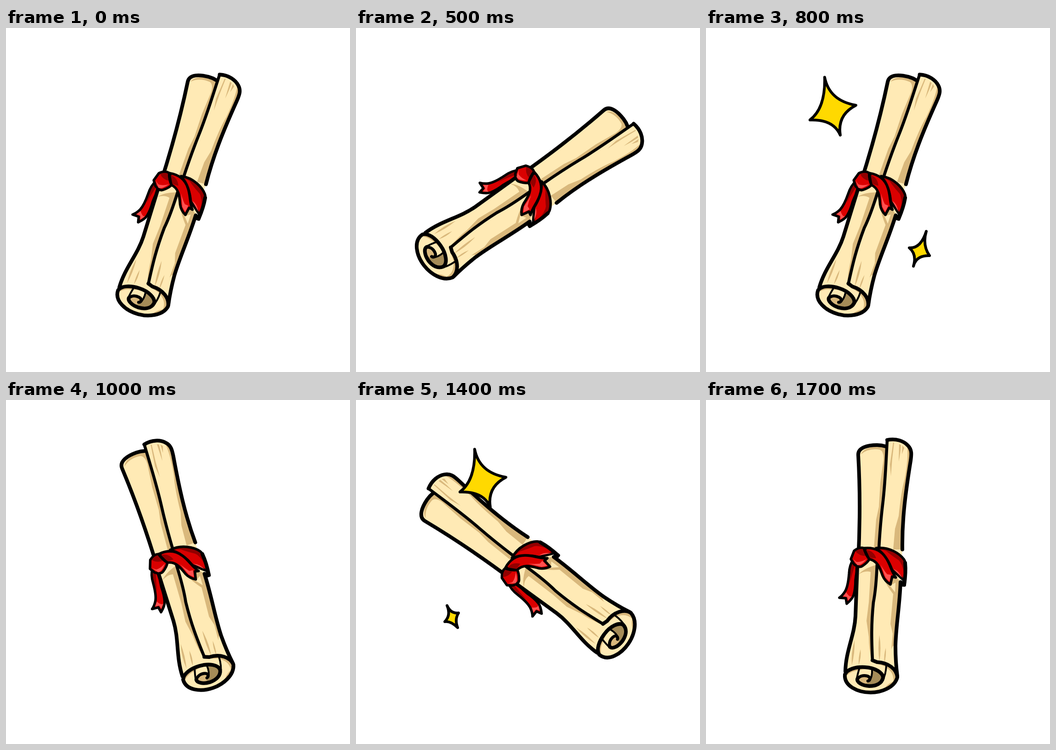
An HTML page without scripts that plays this animation: 748 by 748 pixels, repeating every 1.8 s.

```html
<!DOCTYPE html>
<html lang="en">
<head>
<meta charset="utf-8">
<title>Swinging scroll</title>
<style>
  html, body { margin: 0; width: 100%; height: 100%; overflow: hidden; background: #fff; }
  svg { display: block; width: 100%; height: 100%; }
  path { stroke-linecap: round; stroke-linejoin: round; }
  .line { fill: none; stroke: #000; stroke-width: 8; }
  .mid { stroke-width: 6.5; }
  .thin { stroke-width: 4; }
  .paper { fill: #ffeab5; }
  .shade { fill: #d9b87c; }
  .deep { fill: #a58c58; }
  .red { fill: #da0000; }
  .dark { fill: #920000; }
  .light { fill: #ff5050; }
  .edge { stroke: #000; stroke-width: 5.5; }
  .star { fill: #ffd900; stroke: #000; stroke-width: 6; }
</style>
</head>
<body>
<svg viewBox="0 0 748 748">
  <g transform="translate(375 362)">
    <g>
      <animateTransform attributeName="transform" type="rotate" calcMode="discrete" dur="1.8s" repeatCount="indefinite"
        values="15;30;44;52.1;74;52.1;44;30;15;0;-19.6;-38;-56;-69;-56;-38;-19.6;0"/>
      <g transform="translate(-375 -362)">

        <!-- left ribbon tail -->
        <path class="red edge" d="M321 346Q312 358 311 378Q309 404 303 415Q298 424 290 430L304 431L306 443Q318 433 321 424Q325 411 325 392Q327 370 334 358Z"/>
        <path class="dark" d="M320 352Q314 362 314 378L313 398Q318 376 323 362Z"/>
        <path class="light" d="M305 418L298 427L307 428L309 436L317 427Q311 429 305 418Z"/>

        <!-- paper -->
        <path class="paper" d="M331 120C330 103 352 98 372 98Q382 98 392 101L394 87C413 83 430 89 439 99C448 108 447 118 445 132C434 200 426 260 427 325L423 400C421 450 413 490 412 535Q412 570 417 602C408 630 375 637 358 636C330 636 300 622 302 596C304 545 323 512 325 470L331 350C335 270 335 190 331 120Z"/>

        <!-- paper shadows -->
        <path class="shade" d="M337 118C345 101 372 99 391 102L376 322H365L370 260L376 232L379 180L386 130Q387 112 378 108Q354 104 337 118Z"/>
        <path class="shade" d="M437 98Q448 108 445 132C434 200 426 260 427 325H407L411 280L419 252Q424 200 432 172Q441 122 437 98Z"/>
        <path class="shade" d="M407 92L400 140L402 166Q404 130 409 93ZM420 96L419 134Q423 115 424 98ZM427 99L426 118L431 104Z"/>
        <path class="shade" d="M332 379Q343 366 372 358L367 410L361 470Q358 510 360 568Q354 540 354 515L349 480L354 440L358 374Q346 370 332 379Z"/>
        <path class="shade" d="M374 366L385 386Q393 404 407 422L404 455L401 487L406 508L403 542Q409 525 412 545L412 520Q414 480 419 455L424 396L400 372Z"/>
        <path class="paper" d="M400 404L412 397L411 418Z"/>
        <path class="shade" d="M323 522Q324 550 317 577Q315 550 323 522ZM336 542Q338 560 332 576Q331 560 336 542ZM377 511Q382 540 377 569Q373 540 377 511ZM391 539Q392 558 388 571Q386 555 391 539Z"/>

        <!-- rolled end -->
        <path class="shade" d="M305 592Q320 580 345 580Q376 583 385 602Q380 618 358 623Q334 622 328 608L334 588Q318 588 306 599Z"/>
        <path class="shade" d="M365 571Q402 575 414 594L417 604Q410 622 384 632Q393 618 407 612Q410 592 388 579Z"/>
        <path class="paper" d="M333 588Q348 582 362 588L360 605Q358 598 347 599Q337 600 329 606Z"/>
        <path class="deep" d="M363 586Q378 590 383 602Q379 617 360 621Q350 620 347 617Q362 614 363 586Z"/>
        <path class="line thin" d="M333 585Q330 595 328 605M361 586Q362 602 355 611M392 578Q391 597 384 610"/>

        <!-- outlines -->
        <path class="line" d="M331 350C335 270 335 190 331 120C330 103 352 98 372 98Q382 98 391 101"/>
        <path class="line" d="M427 325C426 260 434 200 445 132C447 118 448 108 439 99C430 89 413 83 394 87"/>
        <path class="line mid" d="M394 87C391 140 390 180 384 228Q379 270 376 322M372 356Q370 410 364 440C359 490 360 520 362 566"/>
        <path class="line" d="M329 362L325 470C323 512 304 545 303 590M423 396C421 450 413 490 412 535Q412 570 416 600"/>
        <path class="line" d="M362 566L372 570C396 571 415 585 416 603C410 626 380 636 358 636C330 636 300 622 302 597C307 585 326 580 345 581C368 582 385 593 385 604C382 617 369 622 355 622C338 621 328 613 329 607"/>
        <path class="line mid" d="M329 607C334 600 342 598 350 600C358 602 358 609 352 611"/>

        <!-- ribbon band -->
        <path class="dark edge" d="M370 322C398 318 422 335 430 346C437 355 434 378 432 403L427 403L430 392Q418 381 406 371Q394 340 370 322Z"/>
        <path class="red" d="M380 325Q405 329 422 352Q431 366 430 386Q420 377 407 368Q397 340 380 325Z"/>
        <path class="dark" d="M388 325Q412 331 427 353Q406 341 388 325Z"/>
        <path class="light" d="M408 368L426 386L428 390Q420 371 408 368Z"/>
        <path class="line" d="M433 354Q435 375 431 402"/>

        <!-- front tail -->
        <path class="red edge" d="M345 322C367 320 382 329 391 343C401 357 403 374 413 386L405 384L401 401Q389 394 384 382C378 364 372 349 355 346Z"/>
        <path class="dark" d="M348 326Q364 327 370 344L356 343Z"/>
        <path class="light" d="M380 358L390 386L399 395L402 380L394 379Q386 370 380 358Z"/>

        <!-- knot -->
        <path class="red edge" d="M322 328Q334 319 343 322Q346 335 355 346Q352 353 340 361Q333 366 322 357L315 346Z"/>
        <path class="dark" d="M325 329Q334 322 341 325Q342 333 347 339Q333 339 325 329Z"/>
        <path class="light" d="M320 346L327 352Q337 353 349 346Q337 361 329 359Z"/>
      </g>
    </g>
  </g>

  <path class="star" opacity="0" d="M258 107Q268 158 326 168Q285 189 292 233Q277 198 226 200Q260 174 258 107Z">
    <animate attributeName="opacity" calcMode="discrete" dur="1.8s" repeatCount="indefinite"
      values="0;0;0;0;0;0;0;1;1;0;0;0;0;1;1;0;0;0"/>
  </path>
  <path class="star" opacity="0" d="M479 442Q470 472 486 495Q457 494 451 518Q459 492 442 478Q467 480 479 442Z">
    <animate attributeName="opacity" calcMode="discrete" dur="1.8s" repeatCount="indefinite"
      values="0;0;1;1;0;0;0;1;1;0;0;0;0;0;0;0;0;0"/>
  </path>
  <path class="star" opacity="0" d="M198 447Q206 465 223 463Q214 477 221 495Q206 480 193 482Q207 468 198 447Z">
    <animate attributeName="opacity" calcMode="discrete" dur="1.8s" repeatCount="indefinite"
      values="0;0;0;0;0;0;0;0;0;0;0;0;0;1;1;0;0;0"/>
  </path>
</svg>
</body>
</html>
```
